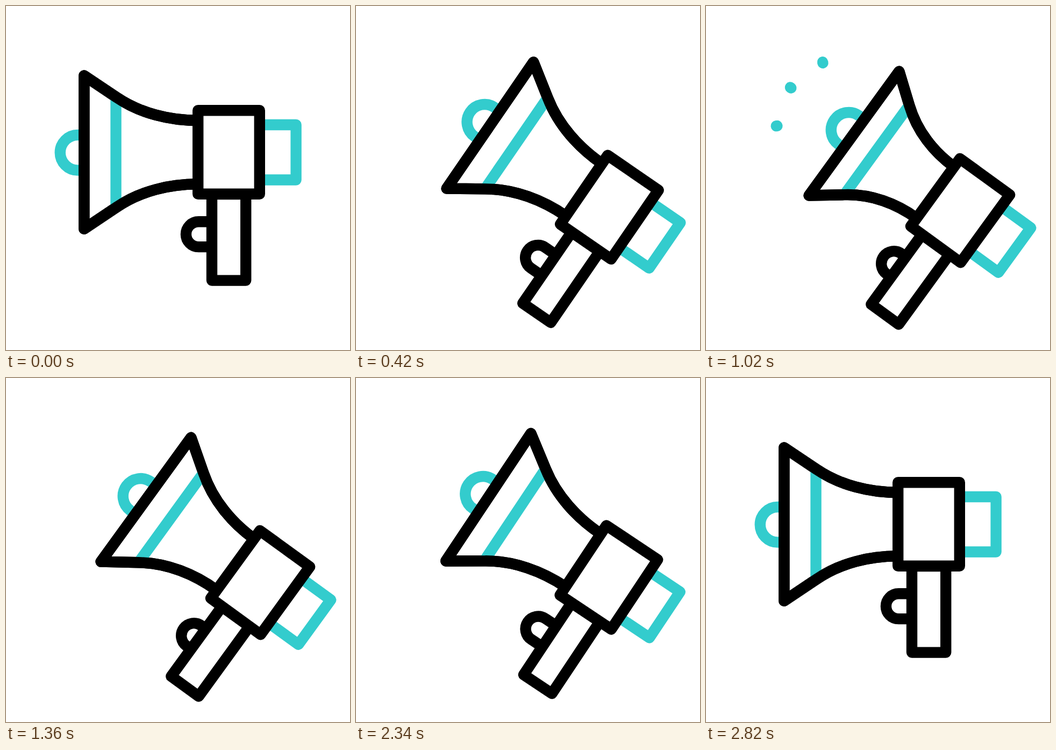
An HTML page that plays this animation: 640 px wide and 640 px high, repeating every 3.1 s.

```html
<!DOCTYPE html>
<html lang="en">
<head>
<meta charset="utf-8">
<title>Megaphone</title>
<style>
  html, body { margin: 0; width: 100%; height: 100%; overflow: hidden; background: #fff; }
  svg { display: block; width: 100vw; height: 100vh; }
  path { fill: none; stroke: #000; stroke-width: 20.4; stroke-linejoin: round; }
  .teal { stroke: #33cccd; }
  .solid { fill: #fff; }
</style>
</head>
<body>
<svg viewBox="0 0 640 640">
  <g id="body">
    <path id="waves" class="teal" stroke-linecap="round"/>
    <path id="ring" class="teal" d="M150 240H133.5a32.8 32.8 0 0 0 0 65.6H150"/>
    <path class="teal" d="M472 221H539.6V323.5H472"/>
    <path id="inside" class="solid" stroke="none"/>
    <path id="stripe" class="teal"/>
    <path id="horn"/>
    <path id="trigger" d="M383 401.3H358.3a23.4 23.4 0 0 0 0 46.8H383"/>
    <path class="solid" d="M383 350V510.6H446.2V350Z"/>
    <path class="solid" d="M357.2 194.2H471.8V349.8H357.2Z"/>
  </g>
</svg>
<script>
  const LOOP = 3100;
  const el = id => document.getElementById(id);
  const ease = s => s * s * (3 - 2 * s);

  // Eased value at time t through [time, value] keys
  function track(t, keys) {
    if (t <= keys[0][0]) return keys[0][1];
    for (let i = 1; i < keys.length; i++) {
      const [t0, v0] = keys[i - 1], [t1, v1] = keys[i];
      if (t < t1) return v0 + (v1 - v0) * ease((t - t0) / (t1 - t0));
    }
    return keys[keys.length - 1][1];
  }

  const TILT = [[0, 0], [480, 1], [2255, 1], [2810, 0]];
  const SQUEEZE = [[480, 0], [880, 38], [1240, 0], [1700, 38], [2110, 0]];
  const PRESS = [[480, 0], [880, 14.5], [1700, 14.5], [2110, 0]];
  const BURSTS = [660, 1425];
  const GROW = 190;
  // Start x, start y, dx, dy of each sound line
  const RAYS = [[92, 241, -47, -42], [87, 272.5, -63, 0], [92, 304, -47, 42]];

  function drawHorn(squeeze) {
    const k = 1 - squeeze / 212;
    const x = v => 357 - (357 - v) * k;
    const d = `M357 213C${x(305)} 213 ${x(250)} 200 ${x(205)} 169.5L${x(145.3)} 129.5` +
      `V414.8L${x(205)} 374.8C${x(250)} 344 ${x(305)} 331.3 357 331.3`;
    el('horn').setAttribute('d', d);
    el('inside').setAttribute('d', d);
    el('stripe').setAttribute('d', `M${x(204.5)} 170V374`);
    el('ring').setAttribute('transform', `translate(${squeeze} 0)`);
  }

  function drawWaves(t) {
    const start = BURSTS.find(b => t > b && t < b + 2 * GROW);
    let d = '';
    if (start !== undefined) {
      const head = track(t, [[start, 0], [start + GROW, 1]]);
      const tail = track(t, [[start + GROW, 0], [start + 2 * GROW, 1]]);
      for (const [x, y, dx, dy] of RAYS)
        d += `M${x + dx * tail} ${y + dy * tail}L${x + dx * head} ${y + dy * head}`;
    }
    el('waves').setAttribute('d', d);
  }

  function draw(now) {
    const t = now % LOOP;
    const p = track(t, TILT);
    el('body').setAttribute('transform',
      `translate(${-81.9 * p} ${62.9 * p}) rotate(${36 * p} 414.5 511)`);
    drawHorn(track(t, SQUEEZE));
    el('trigger').setAttribute('transform', `translate(${track(t, PRESS)} 0)`);
    drawWaves(t);
  }

  const begin = performance.now();
  function frame() {
    draw(performance.now() - begin);
    requestAnimationFrame(frame);
  }
  frame();
</script>
</body>
</html>
```
